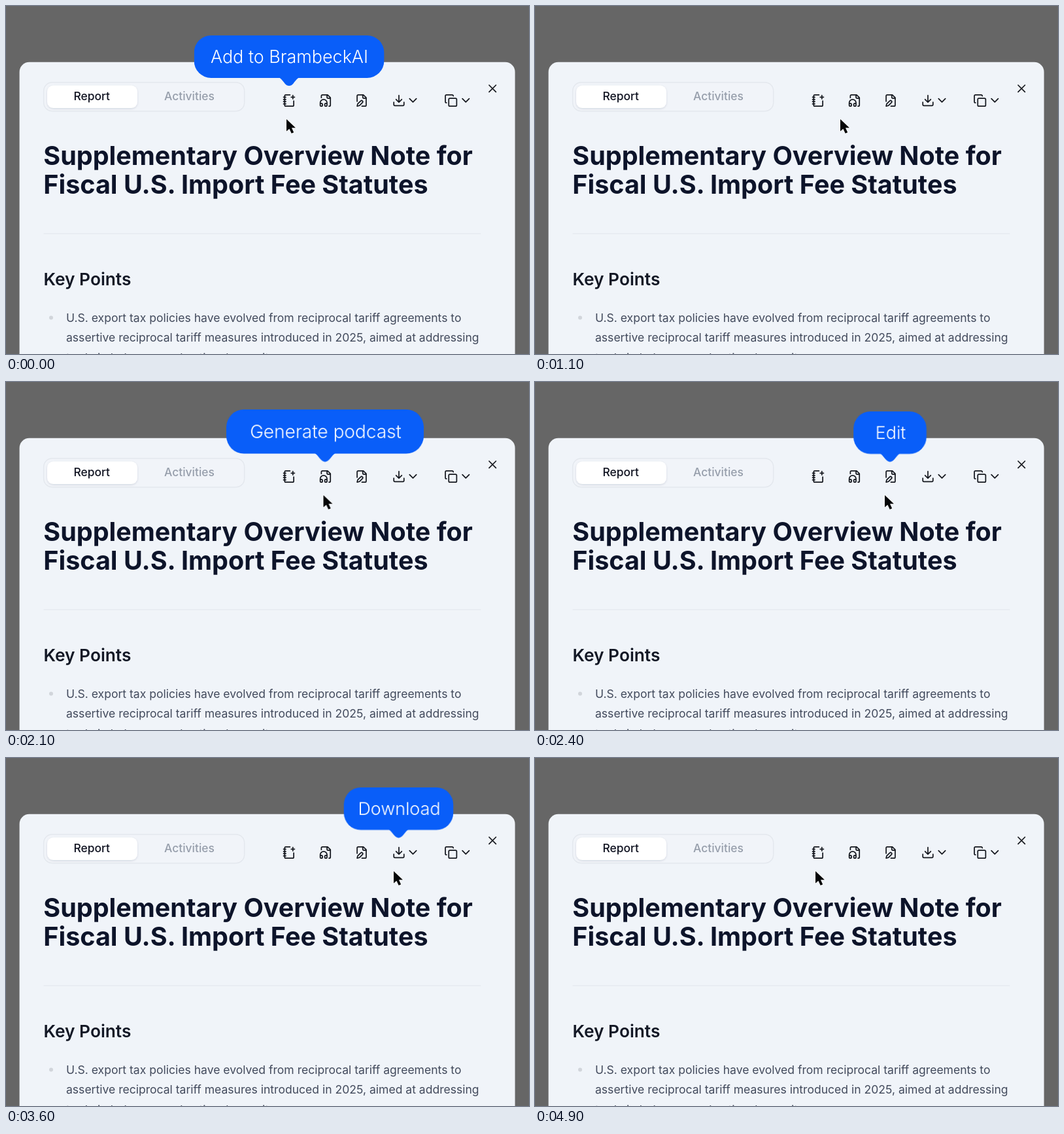
An HTML page for the animation above (5 s loop, 800x532 px).

```html
<!DOCTYPE html>
<html lang="en">
<head>
<meta charset="utf-8">
<title>Report toolbar</title>
<style>
  html, body { margin: 0; width: 100%; height: 100%; overflow: hidden; background: #666; }
  svg { display: block; width: 800px; height: 532px; }
  text { font-family: Inter, "Liberation Sans", sans-serif; font-optical-sizing: none; }

  .tab { font-size: 17.4px; font-weight: 500; text-anchor: middle; fill: #0f1220; }
  .off { fill: #969eab; }
  .title { font-size: 39.5px; font-weight: 700; fill: #0d142a; }
  .head { font-size: 26.3px; font-weight: 600; fill: #131825; }
  .body { font-size: 17.56px; fill: #424a5c; }
  .icon { fill: none; stroke: #15181f; stroke-width: 2; stroke-linecap: round; stroke-linejoin: round; }

  /* Each tip owns a 1.2 s slot; its group origin is the point of the arrow. */
  .tip {
    transform: scale(0);
    fill: #095ef9;
    animation: pop 5s step-end calc(var(--slot) * 1.2s) infinite;
  }
  .tip text { font-size: 28px; font-weight: 350; text-anchor: middle; fill: #fff; }
  @keyframes pop {
    0% { transform: scale(.9625); }
    2% { transform: scale(1.03); }
    4% { transform: scale(1); }
    20% { transform: scale(.6); }
    22%, 100% { transform: scale(0); }
  }

  .cursor { transform: translate(429px, 173px); animation: travel 5s step-end infinite; }
  @keyframes travel {
    0% { transform: translate(429px, 173px); }
    20% { transform: translate(443px, 173px); }
    22% { transform: translate(467px, 173px); }
    24% { transform: translate(480px, 173px); }
    26% { transform: translate(482px, 173px); }
    30% { transform: translate(484px, 173px); }
    34% { transform: translate(485.5px, 173px); }
    44% { transform: translate(498px, 173px); }
    46% { transform: translate(523px, 173px); }
    48% { transform: translate(535px, 173px); }
    52% { transform: translate(537px, 173px); }
    68% { transform: translate(550px, 173px); }
    70% { transform: translate(578px, 173px); }
    72% { transform: translate(593px, 173px); }
    92% { transform: translate(552px, 173px); }
    94% { transform: translate(470px, 173px); }
    96%, 100% { transform: translate(429px, 173px); }
  }
</style>
</head>
<body>
<svg viewBox="0 0 800 532">
  <defs>
    <filter id="soft" x="-10%" y="-20%" width="120%" height="150%">
      <feDropShadow dx="0" dy="1.2" stdDeviation="1.4" flood-color="#1e293b" flood-opacity=".14"/>
    </filter>
    <path id="arrow" d="M-18-14 C-14-13-11-9-7-4 Q0 4 7-4 C11-9 14-13 18-14Z"/>
    <path id="chevron" d="M-6-3 0 3 6-3"/>
    <path id="fold" d="M14 2v4a2 2 0 0 0 2 2h4"/>
  </defs>

  <rect width="800" height="532" fill="#666"/>
  <rect x="20.6" y="85.8" width="758" height="480" rx="15" fill="#f0f4f9"/>

  <rect x="57.7" y="116.7" width="307" height="44" rx="13" fill="#f1f4f9" stroke="#e4e8ee" stroke-width="1.5"/>
  <rect x="63" y="121.5" width="138" height="34.5" rx="9.5" fill="#fff" filter="url(#soft)"/>
  <text class="tab" x="131.2" y="144.4">Report</text>
  <text class="tab off" x="280.5" y="144.4">Activities</text>

  <g class="icon">
    <g transform="translate(433.2 144.5) scale(.865) translate(-12 -12)">
      <path d="M13.4 2H6a2 2 0 0 0-2 2v16a2 2 0 0 0 2 2h12a2 2 0 0 0 2-2v-7.4M2 6h4M2 10h4M2 14h4M2 18h4M18.5 3v6M15.5 6h6"/>
    </g>
    <g transform="translate(489.3 144.5) scale(.865) translate(-12 -12)">
      <path d="M17.5 22h.5a2 2 0 0 0 2-2V7l-5-5H6a2 2 0 0 0-2 2v3"/>
      <path d="M2 19a2 2 0 1 1 4 0v1a2 2 0 1 1-4 0v-4a6 6 0 0 1 12 0v4a2 2 0 1 1-4 0v-1a2 2 0 1 1 4 0"/>
      <use href="#fold"/>
    </g>
    <g transform="translate(544 144.5) scale(.865) translate(-12 -12)">
      <path d="M4 13.5V4a2 2 0 0 1 2-2h9l5 5v13a2 2 0 0 1-2 2h-5.5"/>
      <path d="M10.4 12.6a2.1 2.1 0 1 1 3 3L8 21l-4 1 1-4Z"/>
      <use href="#fold"/>
    </g>
    <g transform="translate(601 144.5) scale(.865) translate(-12 -12)">
      <path d="M21 15v4a2 2 0 0 1-2 2H5a2 2 0 0 1-2-2v-4M7 10l5 5 5-5M12 15V3"/>
    </g>
    <g transform="translate(680.7 144.5) scale(.865) translate(-12 -12)">
      <rect x="8" y="8" width="14" height="14" rx="2"/>
      <path d="M4 16c-1.1 0-2-.9-2-2V4c0-1.1.9-2 2-2h10c1.1 0 2 .9 2 2"/>
    </g>
    <use href="#chevron" transform="translate(622.5 144.3) scale(.865)"/>
    <use href="#chevron" transform="translate(703.3 144.3) scale(.865)"/>
    <path d="M739 121l10.4 10.4M749.4 121l-10.4 10.4" stroke-width="1.7"/>
  </g>

  <text class="title" x="57.3" y="242.8">Supplementary Overview Note for</text>
  <text class="title" x="57.3" y="286.6">Fiscal U.S. Import Fee Statutes</text>
  <path d="M57.5 348H726.5" stroke="#e2e6eb" stroke-width="1.2"/>

  <text class="head" x="57.5" y="426.7">Key Points</text>
  <circle cx="69" cy="476.5" r="3" fill="#d1d5db"/>
  <g class="body">
    <text x="92" y="482.5">U.S. export tax policies have evolved from reciprocal tariff agreements to</text>
    <text x="92" y="513.1">assertive reciprocal tariff measures introduced in 2025, aimed at addressing</text>
    <text x="92" y="543.7">trade imbalances and national security.</text>
  </g>

  <g transform="translate(433 122)">
    <g class="tip" style="--slot:0">
      <rect x="-151" y="-80" width="302" height="67.5" rx="27"/><use href="#arrow"/>
      <text x=".5" y="-36">Add to BrambeckAI</text>
    </g>
  </g>
  <g transform="translate(488 122)">
    <g class="tip" style="--slot:1">
      <rect x="-151" y="-80" width="302" height="67.5" rx="27"/><use href="#arrow"/>
      <text x="1" y="-36">Generate podcast</text>
    </g>
  </g>
  <g transform="translate(543 122)">
    <g class="tip" style="--slot:2">
      <rect x="-58" y="-80" width="116" height="67.5" rx="27"/><use href="#arrow"/>
      <text x="1" y="-36">Edit</text>
    </g>
  </g>
  <g transform="translate(600.5 122)">
    <g class="tip" style="--slot:3">
      <rect x="-87" y="-80" width="174" height="67.5" rx="27"/><use href="#arrow"/>
      <text x="1" y="-36">Download</text>
    </g>
  </g>

  <path class="cursor" d="M0 0V18.6L4.4 14.7 7.7 21.8 11.2 20.2 8 13.3H14Z"
        fill="#050608" stroke="#fff" stroke-width="1.2" stroke-linejoin="round" paint-order="stroke"/>
</svg>
</body>
</html>
```
